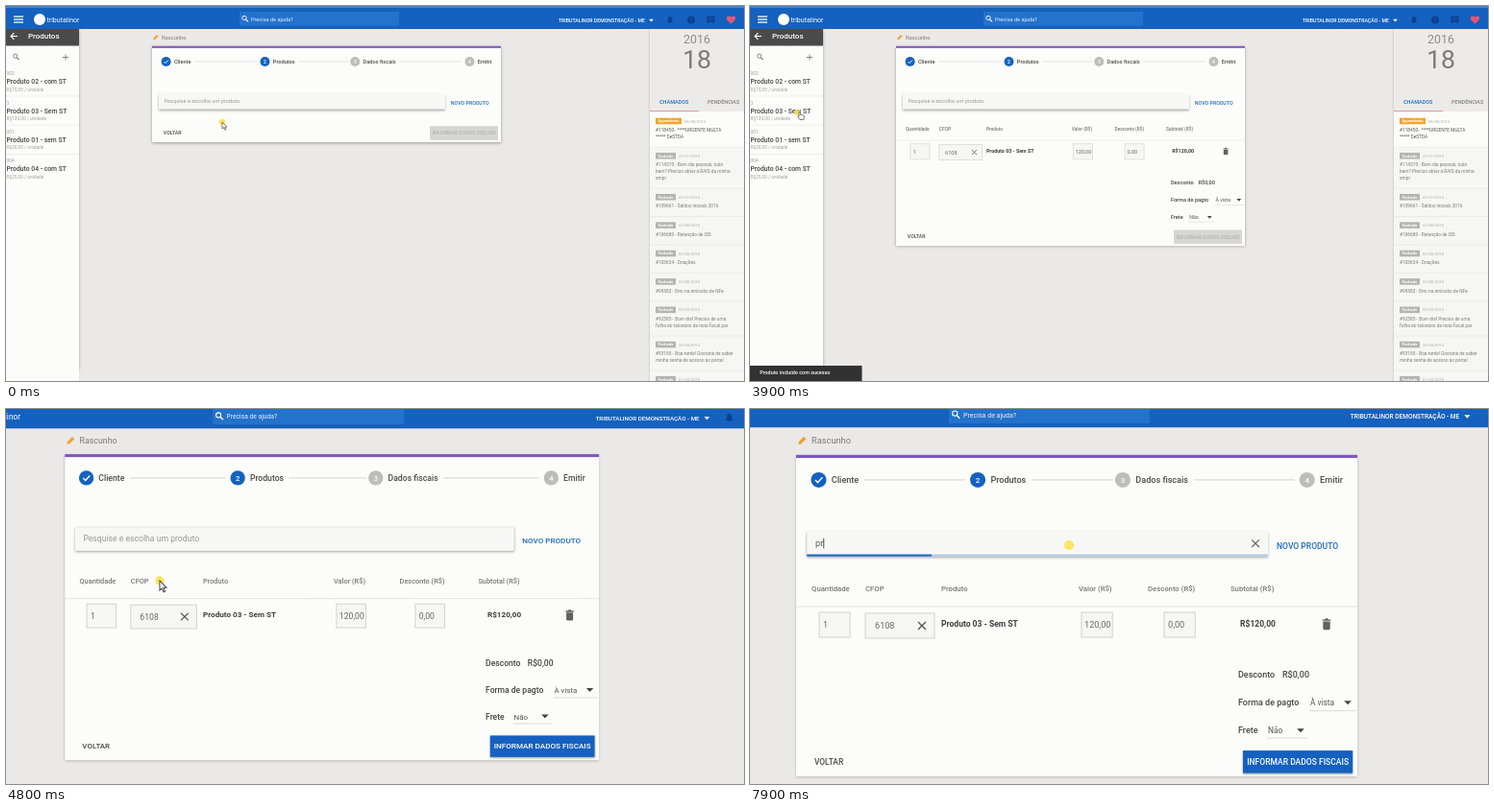
These frames come from a looping animation (768 px wide and 391 px high, 8000 ms). An HTML page with a canvas:

```html
<!DOCTYPE html>
<html lang="pt-BR">
<head>
<meta charset="utf-8">
<style>
html, body { margin: 0; width: 100%; height: 100%; overflow: hidden; background: #ebe9e8; }
canvas { display: block; }
</style>
</head>
<body>
<canvas id="stage" width="768" height="391"></canvas>
<script>
const ctx = document.getElementById('stage').getContext('2d');
const LOOP = 8000, BLUE = '#1461bf', CARD = '#fcfdfb';
const LOADING = 2750, LOADED = 3700, ENABLED = 4400, FOCUS = 6900, TYPE_P = 7450, TYPE_R = 7700;

const products = [
  ['002', 'Produto 02 - com ST', 'R$10,00'],
  ['3', 'Produto 03 - Sem ST', 'R$120,00'],
  ['001', 'Produto 01 - sem ST', 'R$20,00'],
  ['004', 'Produto 04 - com ST', 'R$25,00']
];
const tickets = [
  ['08/08/2016', '#118450 - ****URGENTE MULTA', '***** DeSTDA'],
  ['22/07/2016', '#114570 - Bom dia pessoal, tudo', 'bem? Preciso obter a RAIS da minha', 'empr'],
  ['05/07/2016', '#109661 - Saldos iniciais 2016'],
  ['22/06/2016', '#106680 - Retenção de ISS'],
  ['09/06/2016', '#103634 - Doações'],
  ['23/05/2016', '#99583 - Erro na emissão de NFe'],
  ['09/05/2016', '#92585 - Bom dia! Preciso de uma', 'folha do talonário de nota fiscal par'],
  ['28/04/2016', '#93165 - Boa tarde! Gostaria de saber', 'minha senha de acesso ao portal'],
  ['01/04/2016', '']
];
// Pointer stops in screen space: time, x, y
const pointerPath = [
  [0, 225, 121], [300, 225, 121], [1400, 50, 106], [1800, 50, 106], [2700, 47, 112], [3300, 47, 112],
  [4100, 50, 111], [4300, 50, 111], [4800, 160, 179], [5200, 160, 179], [5900, 549, 231],
  [6250, 570, 366], [6350, 570, 366], [6600, 332, 142], [LOOP, 332, 142]
];

const smooth = (a, b, t) => {
  const u = Math.min(1, Math.max(0, (t - a) / (b - a)));
  return u * u * (3 - 2 * u);
};

function rect(x, y, w, h, color) {
  ctx.fillStyle = color;
  ctx.fillRect(x, y, w, h);
}

function shadowRect(x, y, w, h, color, blur = 2, shade = 'rgba(0,0,0,.35)') {
  ctx.save();
  ctx.shadowColor = shade;
  ctx.shadowBlur = blur;
  ctx.shadowOffsetY = 1;
  rect(x, y, w, h, color);
  ctx.restore();
}

function disc(x, y, r, color) {
  ctx.fillStyle = color;
  ctx.beginPath();
  ctx.arc(x, y, r, 0, 7);
  ctx.fill();
}

// y is the optical middle of the line
function text(str, x, y, size, color, weight = 400, align = 'left') {
  ctx.font = `${weight} ${size}px Roboto, sans-serif`;
  ctx.textAlign = align;
  ctx.fillStyle = color;
  ctx.fillText(str, x, y + size * 0.36);
}

function line(points, color, width = 0.5) {
  ctx.strokeStyle = color;
  ctx.lineWidth = width;
  ctx.beginPath();
  for (let i = 0; i < points.length; i += 2) ctx.lineTo(points[i], points[i + 1]);
  ctx.stroke();
}

function shape(d, x, y, color, scale = 1, outline) {
  ctx.save();
  ctx.translate(x, y);
  ctx.scale(scale, scale);
  const path = new Path2D(d);
  ctx.fillStyle = color;
  ctx.fill(path);
  if (outline) {
    ctx.strokeStyle = outline;
    ctx.lineWidth = 0.7;
    ctx.stroke(path);
  }
  ctx.restore();
}

const caretDown = (x, y, color) => shape('M-2.4-1.2h4.8L0 1.4z', x, y, color);

function cross(x, y, r, color) {
  line([x - r, y - r, x + r, y + r], color, 0.8);
  line([x - r, y + r, x + r, y - r], color, 0.8);
}

function magnifier(x, y, color) {
  ctx.strokeStyle = color;
  ctx.lineWidth = 0.9;
  ctx.beginPath();
  ctx.arc(x - 0.8, y - 0.8, 2.1, 0, 7);
  ctx.stroke();
  line([x + 0.8, y + 0.8, x + 3.2, y + 3.2], color, 1.1);
}

function field(x, y, w, value, textX) {
  rect(x, y, w, 16.2, '#f6f7f5');
  ctx.strokeStyle = '#cfcfcd';
  ctx.lineWidth = 0.6;
  ctx.strokeRect(x, y, w, 16.2);
  text(value, textX, y + 8.1, 5.65, '#666');
}

function camera(p, zoom, dx, dy) {
  ctx.setTransform(1 + zoom * p, 0, 0, 1 + zoom * p, dx * p, dy * p);
}

function sidebar() {
  shadowRect(0, 24, 76, 354, CARD, 3);
  rect(0, 24, 76, 367, CARD);
  rect(0, 24, 76, 17.5, '#4a4a4a');
  line([12, 31.5, 5, 31.5], '#fff', 1.1);
  line([8.4, 28.1, 5, 31.5, 8.4, 34.9], '#fff', 1.1);
  text('Produtos', 23, 31, 8, '#fff', 500);
  magnifier(10.5, 53, '#777');
  line([59, 53.5, 65, 53.5], '#777', 0.9);
  line([62, 50.5, 62, 56.5], '#777', 0.9);
  products.forEach(([code, name, price], i) => {
    const y = 79 + i * 30.3;
    text(code, 0.5, y - 8.3, 4.8, '#9a9a9a');
    text(name, 0.5, y, 6.8, '#444', 500);
    text(price + ' / unidade', 0.5, y + 8, 4.8, '#a0a0a0');
    if (i < 3) line([0, y + 15, 76, y + 15], '#dcdcda');
  });
}

function stepper() {
  const steps = [[166.6, 'Cliente'], [269.5, 'Produtos'], [363.3, 'Dados fiscais'], [482.5, 'Emitir']];
  steps.forEach(([x, label], i) => {
    disc(x, 58, 5, i < 2 ? BLUE : '#bdbdbb');
    if (i) text(i + 1, x, 58, 5, '#fff', 500, 'center');
    else line([x - 2.2, 58, x - 0.6, 59.7, x + 2.4, 56.4], '#fff', 0.9);
    text(label, x + 8.3, 58, 5.65, '#4a4a4a', 500);
  });
  for (const [a, b] of [[196, 261.4], [304.3, 357], [409.3, 474.6]]) line([a, 58, b, 58], '#c6c6c4');
}

function searchField(t) {
  shadowRect(159, 91.6, 298.3, 16, '#f7f8f6', 2.5);
  const typed = t < TYPE_P ? '' : t < TYPE_R ? 'p' : 'pr';
  text(typed || 'Pesquise e escolha um produto', 164.5, 99, 5.65, typed ? '#555' : '#979797');
  if (t >= FOCUS) {
    const x = 164.8 + (typed ? ctx.measureText(typed).width : 0);
    line([x, 95.8, x, 102.4], '#444', 0.6);
  }
  if (!typed) return;
  cross(449.1, 99.2, 2.4, '#666');
  rect(159, 106.3, 298.3, 1.2, '#a9c5e6');
  const head = 298.3 * 1.4 * (t - 7650) / 1300, tail = Math.max(0, head - 134);
  if (head > 0) rect(159 + tail, 106.3, head - tail, 1.2, BLUE);
}

function orderTable() {
  const heads = [[162, 'Quantidade'], [196.8, 'CFOP'], [245.9, 'Produto'], [334.7, 'Valor (R$)'],
    [379.5, 'Desconto (R$)'], [432.9, 'Subtotal (R$)']];
  for (const [x, label] of heads) text(label, x, 128.3, 4.8, '#777', 500);
  line([152, 140.1, 515, 140.1], '#dededc');
  field(166.9, 143.8, 20, '1', 169.4);
  field(196.8, 144.4, 44.7, '6108', 203);
  cross(233.4, 152.5, 2.5, '#555');
  text('Produto 03 - Sem ST', 245.9, 151, 5.3, '#3c3c3c', 700);
  field(336.6, 143.8, 20, '120,00', 338.5);
  field(390.1, 143.8, 20, '0,00', 392.6);
  text('R$120,00', 439.2, 151, 5.3, '#3c3c3c', 700);
  shape('M-2.7-3h1.5l.6-.7h1.2l.6.7h1.5v.9h-5.4zM-2.3-1.7h4.6v4.6q0 .8-.8.8h-3q-.8 0-.8-.8z', 495.1, 151.4, '#606060');

  text('Desconto', 437.9, 184.2, 5.6, '#444', 500);
  text('R$0,00', 466.5, 184.2, 5.6, '#444', 500);
  text('Forma de pagto', 437.9, 202.3, 5.6, '#444', 500);
  text('À vista', 484.5, 202.5, 5.2, '#555');
  caretDown(508.8, 202.3, '#444');
  line([484, 207.6, 514, 207.6], '#d0d0ce');
  text('Frete', 437.9, 220.3, 5.6, '#444', 500);
  text('Não', 457.2, 220.5, 5.2, '#555');
  caretDown(478.3, 220.3, '#444');
  line([456.5, 225.3, 483, 225.3], '#d0d0ce');
}

function orderCard(t, height) {
  shape('M-2.6 2.6l.4-1.8L1-2.4l1.5 1.5L-.8 2.3z', 156, 32.4, '#f0a030');
  text('Rascunho', 162, 32.6, 5.75, '#7a7a7a');
  shadowRect(152, 42, 363, height, CARD, 3);
  rect(152, 41.8, 363, 2, '#7e57c2');
  stepper();
  searchField(t);
  text('NOVO PRODUTO', 462.8, 100.6, 5.3, '#1f6bc6', 500);
  if (t >= LOADED) orderTable();

  const y = 42 + height - 9.6, on = t >= ENABLED;
  text('VOLTAR', 163.8, y, 5.2, '#4a4a4a', 500);
  if (on) shadowRect(441, y - 7.2, 71, 14.6, BLUE);
  else rect(441, y - 7.2, 71, 14.6, '#d6d7d5');
  text('INFORMAR DADOS FISCAIS', 476.5, y, 5.3, on ? '#fff' : '#b2b3b1', 500, 'center');
}

function ticketPanel() {
  shadowRect(670, 24, 98, 367, '#f6f6f5', 2, 'rgba(0,0,0,.25)');
  rect(670, 24, 98, 86, '#ecebea');
  text('2016', 719, 35, 12.4, '#8c8c8c', 400, 'center');
  text('18', 719, 55, 26.7, '#7c7c7c', 400, 'center');
  text('CHAMADOS', 680, 100, 5.5, '#1f6bc6', 500);
  text('PENDÊNCIAS', 730, 100, 5.5, '#808080', 500);
  rect(670, 109.4, 51, 0.8, '#e4567c');
  let y = 120;
  tickets.forEach(([date, ...lines], i) => {
    const pitch = 22.6 + 6.8 * lines.length, w = i ? 21 : 27;
    if (!i) rect(670, 110.2, 98, pitch + 0.8, CARD);
    rect(676, y - 3.3, w, 6.6, i ? '#b4b4b2' : '#f5a52a');
    text(i ? 'Fechado' : 'Aguardando', 676 + w / 2, y, 4, '#fff', 700, 'center');
    text(date, 679 + w, y, 4.2, '#b0b0b0');
    lines.forEach((s, n) => text(s, 676, y + 9.5 + n * 6.8, 4.8, i ? '#7a7a7a' : '#555'));
    line([670, y + pitch - 9, 768, y + pitch - 9], '#dededc');
    y += pitch;
  });
}

function loader(t, height) {
  const k = smooth(LOADING, 2950, t) * (1 - smooth(LOADED - 100, LOADED + 100, t));
  if (!k) return;
  ctx.globalAlpha = k * 0.5;
  rect(0, 24, 76, 367, '#fff');
  rect(152, 41.8, 363, height, '#fff');
  rect(670, 24, 98, 367, '#fff');
  ctx.globalAlpha = k;
  const a = -0.8 + (t - 3000) / 1200 * Math.PI * 2;
  ctx.strokeStyle = BLUE;
  ctx.lineWidth = 2.6;
  ctx.beginPath();
  ctx.arc(345, 157, 8.8, a, a + 3.2);
  ctx.stroke();
  ctx.globalAlpha = 1;
}

function toast(t) {
  if (t < LOADED) return;
  const y = 373 + 20 * (1 - smooth(LOADED, LOADED + 250, t));
  rect(0, y, 116.5, 20, '#323232');
  text('Produto incluído com sucesso', 10.3, y + 6.6, 5.4, '#fff', 500);
}

function topBar() {
  rect(0, 0, 768, 24, BLUE);
  rect(0, 0, 768, 2, '#3f84d0');
  for (const y of [11, 14, 17]) line([8, y, 18, y], '#fff', 1.3);
  disc(35, 14, 6, '#fff');
  text('tributalinor', 42.5, 14, 7, '#fff');
  rect(243, 6, 166, 14.6, '#2472cb');
  magnifier(248.8, 13.2, '#fff');
  text('Precisa de ajuda?', 255, 13.5, 5.6, '#eaf2fb');
  text('TRIBUTALINOR DEMONSTRAÇÃO - ME', 665, 15, 5.2, '#fff', 500, 'right');
  caretDown(671.5, 15, '#fff');
  const navy = '#0d3f8e';
  shape('M-3 2.5v-.6l.9-.9v-2q0-2.2 2.1-2.6 2.1.4 2.1 2.6v2l.9.9v.6zM-.8 3h1.6L0 3.8z', 691, 14.5, navy);
  disc(713, 14.5, 4, navy);
  text('?', 713, 14.5, 5.5, BLUE, 700, 'center');
  shape('M-4-4h8v6.4h-6.4L-4 4z', 733.5, 14.5, navy);
  for (const y of [12.4, 14.2]) line([731, y, 736, y], BLUE, 0.7);
  shape('M0 4C-2.8 1.6-4.6.2-4.6-1.7-4.6-4.4-1.4-4.8 0-2.6 1.4-4.8 4.6-4.4 4.6-1.7 4.6.2 2.8 1.6 0 4z', 754.5, 14.5, '#ea5572');
}

function pointer(t, zoom) {
  const i = pointerPath.findIndex(stop => stop[0] > t);
  const [t0, x0, y0] = pointerPath[i - 1], [t1, x1, y1] = pointerPath[i];
  const k = smooth(t0, t1, t), x = x0 + (x1 - x0) * k, y = y0 + (y1 - y0) * k;
  disc(x, y, 3.3 * zoom, 'rgba(250,222,60,.8)');
  const hand = (t > 1250 && t < 4350) || (t > 6200 && t < 6400);
  if (hand) shape('M0 0q1-.8 1.4.4v2.2l3.4.8q.8.4.6 1.4l-.6 3H.8L-1.4 4.6q.2-.9 1.4-.1z', x + 1.5, y - 0.5, '#fff', zoom, '#444');
  else if (t < 6550) shape('M0 0v7l1.6-1.4 1.2 2.6 1.1-.5-1.2-2.6h2.2z', x, y, '#fff', zoom, '#444');
}

function draw(t) {
  const zoomMain = smooth(4141, 4991, t), height = t < LOADED ? 100 : 208.2;
  ctx.setTransform(1, 0, 0, 1, 0, 0);
  rect(0, 0, 768, 391, '#ebe9e8');
  camera(zoomMain, 0.609, -196.6, -19.4);
  sidebar();
  orderCard(t, height);
  ticketPanel();
  loader(t, height);
  toast(t);
  camera(smooth(3946, 5183, t), 0.259, -99, -11);
  topBar();
  ctx.setTransform(1, 0, 0, 1, 0, 0);
  pointer(t, 1 + 0.5 * zoomMain);
}

const start = performance.now();
function tick() {
  draw((performance.now() - start) % LOOP);
  requestAnimationFrame(tick);
}
tick();
</script>
</body>
</html>
```
